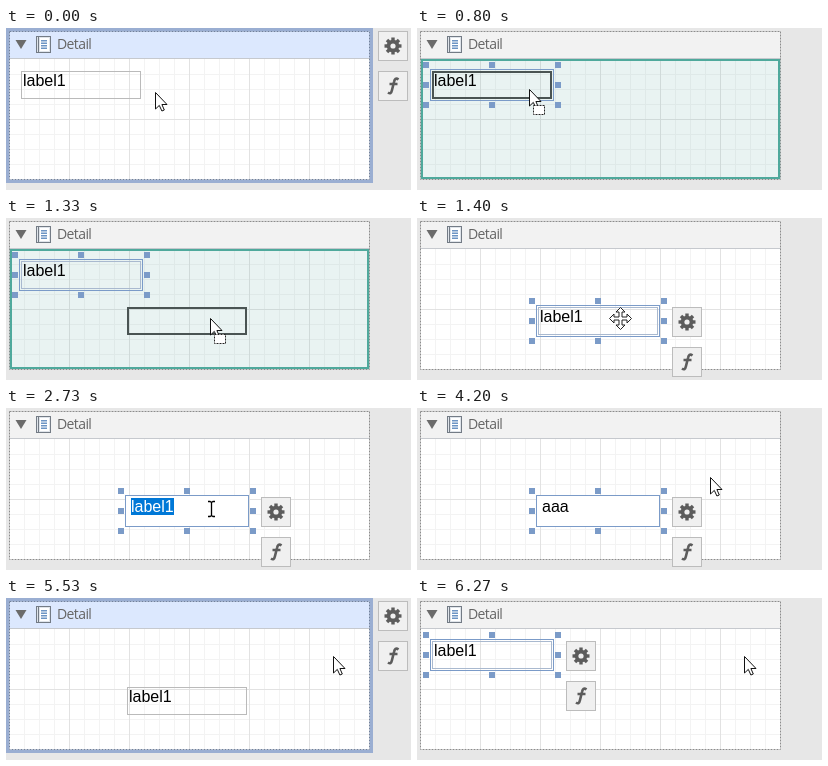
These frames come from a looping animation (405x162 px, 8000 ms). An HTML page with a canvas:

```html
<!DOCTYPE html>
<html lang="en">
<head>
<meta charset="utf-8">
<title>Report label editing</title>
<style>
html, body { margin: 0; width: 100%; height: 100%; overflow: hidden; background: #e7e7e7; }
canvas { display: block; }
</style>
</head>
<body>
<canvas id="stage" width="405" height="162"></canvas>
<script>
const ctx = document.getElementById('stage').getContext('2d');
const STEPS_PER_MS = 15 / 1000, LOOP = 8000;
const BLUE = '#7b9bc8', DARK = '#5c5c5c';

// Pointer keyframes: step, x, y
const path = [
  [0, 149, 64], [1, 137, 61], [2, 118, 57], [4, 98, 54], [11, 98, 54],
  [12, 112, 61], [13, 140, 74], [14, 158, 81], [15, 169, 85], [16, 180, 90],
  [17, 190, 94], [18, 198, 98], [19, 204, 100], [32, 204, 100], [33, 205, 101],
  [60, 205, 101], [61, 254, 85], [63, 293, 69], [65, 327, 58], [120, 327, 58]
];

function pointerAt(step) {
  const i = path.findIndex(p => p[0] > step);
  const [s0, x0, y0] = path[i - 1], [s1, x1, y1] = path[i];
  const k = (step - s0) / (s1 - s0);
  return [Math.round(x0 + (x1 - x0) * k), Math.round(y0 + (y1 - y0) * k)];
}

function box(x, y, w, h, color) {
  ctx.fillStyle = color;
  ctx.fillRect(x, y, w, h);
}

function frame(x, y, w, h, color, line = 1, dash = []) {
  ctx.setLineDash(dash);
  ctx.lineWidth = line;
  ctx.strokeStyle = color;
  ctx.strokeRect(x + line / 2, y + line / 2, w - line, h - line);
  ctx.setLineDash([]);
}

function shape(x, y, d, fill, stroke, line = 1) {
  ctx.save();
  ctx.translate(x, y);
  const p = new Path2D(d);
  if (fill) { ctx.fillStyle = fill; ctx.fill(p); }
  if (stroke) { ctx.strokeStyle = stroke; ctx.lineWidth = line; ctx.stroke(p); }
  ctx.restore();
}

function text(str, x, y, color, font) {
  ctx.font = font;
  ctx.fillStyle = color;
  ctx.fillText(str, x, y);
}

const labelText = (str, x, y, color = '#000') =>
  text(str, x, y, color, '16px "Liberation Sans", Arial, sans-serif');

function reportIcon(x, y) {
  box(x, y, 15, 17, '#dfe4ea');
  frame(x, y, 15, 17, '#737b85');
  box(x + 2, y + 1, 1, 15, '#737b85');
  box(x + 4, y + 2, 9, 13, '#fff');
  for (let i = 0; i < 4; i++) box(x + 5, y + 4 + i * 2.5, 6, 1.5, '#6c94c4');
}

function band(active, dragging) {
  box(0, 0, 405, 162, '#e7e7e7');
  if (active) box(0, 0, 367, 155, '#9aaed2');
  box(3, 3, 361, 28, active ? '#dce8fe' : '#f2f2f2');
  box(3, 30, 361, 122, '#fff');
  for (const major of [false, true]) {
    const color = major ? '#e2e2e2' : '#f3f3f3', gap = major ? 60 : 15;
    for (let x = 3 + gap; x < 363; x += gap) box(x, 31, 1, 120, color);
    for (let y = 31 + gap; y < 151; y += gap) box(3, y, 360, 1, color);
  }
  box(3, 30, 361, 1, '#c6c9ce');
  frame(3, 3, 361, 149, active ? '#71819c' : '#8c8c8c', 1, [2, 1]);
  shape(15, 12, 'M-5.5 0H5.5L0 9Z', '#6b6b6b');
  reportIcon(30, 8);

  ctx.letterSpacing = '-0.6px';
  text('Detail', 51, 21, '#666', '14px "Open Sans", "Noto Sans", sans-serif');
  ctx.letterSpacing = '0px';
  if (dragging) {
    box(3, 31, 361, 120, 'rgba(79,160,150,.125)');
    frame(4, 31, 359, 120, '#4fa99c', 2);
  }
}

function gear(x, y) {
  ctx.save();
  ctx.translate(x, y);
  ctx.fillStyle = DARK;
  for (let i = 0; i < 8; i++) {
    ctx.fillRect(-1.7, -8.5, 3.4, 4);
    ctx.rotate(Math.PI / 4);
  }
  ctx.beginPath();
  ctx.arc(0, 0, 6.3, 0, 7);
  ctx.fill();
  ctx.fillStyle = '#f0f0f0';
  ctx.beginPath();
  ctx.arc(0, 0, 2.6, 0, 7);
  ctx.fill();
  ctx.restore();
}

function buttons(x, y) {
  for (const top of [y, y + 40]) {
    box(x, top, 30, 30, '#f0f0f0');
    frame(x, top, 30, 30, '#bcbcbc');
  }
  gear(x + 15, y + 15);
  shape(x + 15, y + 55, 'M5.5 -6.5C3 -8.5 1.6 -7 1 -4L-1 4C-1.7 7.5 -3 8 -5 6.5M-3.5 -2H4.5', null, DARK, 2.6);
}

function label(x, y, str, selected) {
  frame(x, y, 120, 28, selected ? '#a9b9cf' : '#bababa');
  if (selected) selection(x, y);
  labelText(str, x + 2, y + 15);
}

function selection(x, y) {
  frame(x - 2, y - 2, 124, 32, BLUE);
  for (const col of [-1, 0, 1])
    for (const row of [-1, 0, 1])
      if (col || row) box(x + 57 + col * 66, y + 11 + row * 20, 6, 6, BLUE);
}

function editor(x, y, str, highlighted, caret) {
  box(x - 1, y - 1, 122, 30, '#fff');
  selection(x, y);
  if (highlighted) box(x + 4, y + 1, 43, 17, '#0078d7');
  labelText(str, x + 4, y + 15, highlighted ? '#fff' : '#000');
  if (caret) box(x + 4 + (highlighted ? 42 : str.length * 9), y, 1, 18, '#000');
}

const cursors = {
  arrow(x, y) {
    shape(x, y, 'M.5 .5V17L4.3 13.4L6.9 19L9.3 18L6.9 12.5H12Z', '#fff', '#111');
  },
  drag(x, y) {
    cursors.arrow(x, y);
    box(x + 4, y + 16, 11, 10, '#fff');
    frame(x + 4, y + 16, 12, 10, '#222', 1, [2, 1]);
  },
  move(x, y) {
    let d = 'M0 -11';
    const arm = [[4.5, -6.5], [1.5, -6.5], [1.5, -1.5], [6.5, -1.5], [6.5, -4.5], [11, 0]];
    for (let i = 0; i < 4; i++) {
      for (const p of arm) {
        let [a, b] = p;
        for (let j = 0; j < i; j++) [a, b] = [-b, a];
        d += `L${a} ${b}`;
      }
    }
    shape(x - 0.5, y + 0.5, d + 'Z', '#fff', '#222');
  },
  beam(x, y) {
    shape(x, y, 'M-3 -7.5H-1L.5 -6.5L2 -7.5H4M.5 -6.5V6.5M-3 7.5H-1L.5 6.5L2 7.5H4', null, '#000', 1.3);
  }
};

function cursorKind(s) {
  if (s < 2 || s >= 61) return 'arrow';
  if (s >= 45) return null;
  if (s >= 33) return 'beam';
  return s >= 12 && s < 21 ? 'drag' : 'move';
}

function draw(s) {
  const active = s < 10 || (s >= 70 && s < 94);
  const dragging = s >= 12 && s < 21;
  const editing = s >= 32 && s < 70;
  const [x, y] = s >= 21 && s < 94 ? [121, 89] : [15, 43];
  const typed = s < 45 || s >= 83 ? 'label1' : s < 48 ? 'a' : s < 51 ? 'aa' : 'aaa';

  band(active, dragging);
  if (editing) {
    const caret = (s >= 33 && s < 41) || (s >= 45 && s < 59) || s >= 67;
    editor(x, y, typed, s >= 33 && s < 45, caret);
  } else {
    label(x, y, typed, !active);
  }
  if (active) buttons(372, 3);
  else if (!dragging) buttons(x + 134, y);
  if (dragging) {
    const [gx, gy] = pointerAt(s - 1);
    frame(gx - 83, gy - 11, 120, 28, '#4a5453', 2);
  }
  const kind = cursorKind(s);
  if (kind) cursors[kind](...pointerAt(s));
}

function tick() {
  // The small lead absorbs rounding of step times to 10 ms.
  draw(Math.floor(((performance.now() + 4) % LOOP) * STEPS_PER_MS));
  requestAnimationFrame(tick);
}
tick();
</script>
</body>
</html>
```
